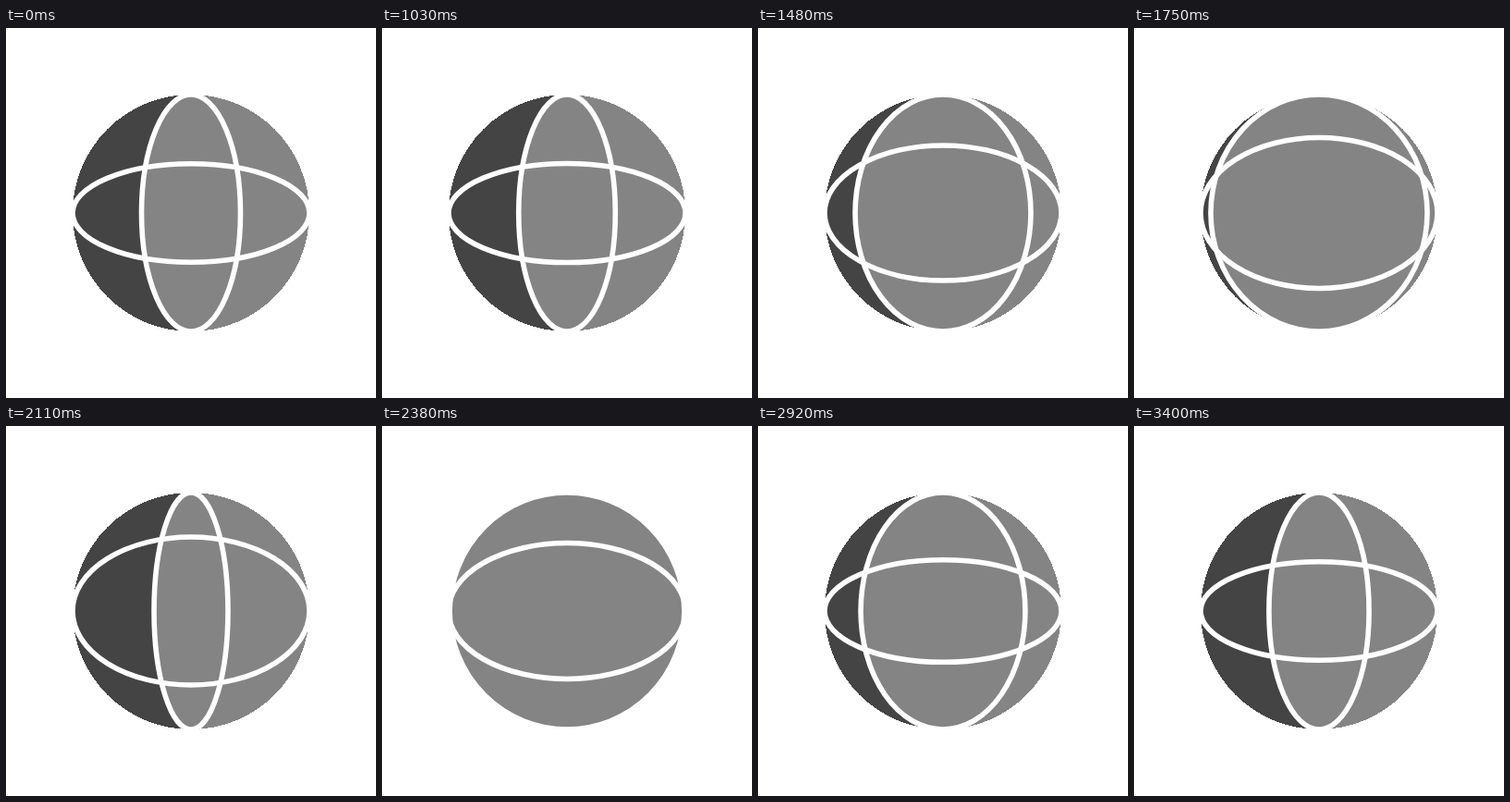
Animation of 400 by 400 pixels, one loop 3490 ms. Source, as an HTML page:

```html
<!DOCTYPE html>
<html lang="en">
<head>
<meta charset="utf-8">
<title>Spinning globe</title>
<style>
  html, body { margin: 0; width: 100%; height: 100%; overflow: hidden; background: #fff; }
  svg { display: block; width: 100vw; height: 100vh; }
  .ball { shape-rendering: crispEdges; }
  .ring { stroke: #fff; stroke-width: 5.6; }
</style>
</head>
<body>
<svg viewBox="0 0 400 400">
  <circle class="ball" cx="200" cy="200" r="128" fill="#848484"/>
  <path class="ball" d="M200 72A128 128 0 0 0 200 328Z" fill="#444"/>
  <ellipse id="meridian" class="ring" cx="200" cy="200" rx="53.5" ry="128" fill="#848484"/>
  <ellipse id="equator" class="ring" cx="200" cy="200" rx="128" ry="53.3" fill="none"/>
</svg>
<script>
  const LOOP = 3490, HOLD = 1000, STEP = 30, LAST = 80, R = 128, START = 24.7;
  const meridian = document.getElementById('meridian');
  const equator = document.getElementById('equator');

  // Monotone cubic curve through [x, y] points, flat at both ends.
  function curve(pts) {
    const slope = pts.slice(1).map((p, i) => (p[1] - pts[i][1]) / (p[0] - pts[i][0]));
    const tan = pts.map((_, i) => {
      const a = slope[i - 1] || 0, b = slope[i] || 0;
      return a * b > 0 ? 2 * a * b / (a + b) : 0;
    });
    return x => {
      let i = 0;
      while (i < pts.length - 2 && x > pts[i + 1][0]) i++;
      const [x0, y0] = pts[i], [x1, y1] = pts[i + 1];
      const w = x1 - x0, u = (x - x0) / w, v = 1 - u;
      return y0 * v * v * (1 + 2 * u) + y1 * u * u * (3 - 2 * u)
        + w * u * v * (tan[i] * v - tan[i + 1] * u);
    };
  }

  const spin = curve([[0, 0], [9, 30.5], [25, 138.6], [37, 222.9], [46, 287], [64, 340.7], [80, 359.7]]);
  const tilt = curve([[0, 53.3], [9, 64], [25, 81.5], [30, 82.5], [37, 80], [46, 73.5], [64, 55.3], [73, 53.3], [80, 53.3]]);

  function draw() {
    const t = performance.now() % LOOP;
    const n = Math.min(LAST, Math.max(0, Math.floor((t - HOLD) / STEP)));
    const angle = (START - spin(n)) * Math.PI / 180;
    meridian.setAttribute('rx', Math.max(0.1, Math.abs(R * Math.sin(angle))).toFixed(2));
    equator.setAttribute('ry', tilt(n).toFixed(2));
    requestAnimationFrame(draw);
  }
  draw();
</script>
</body>
</html>
```
